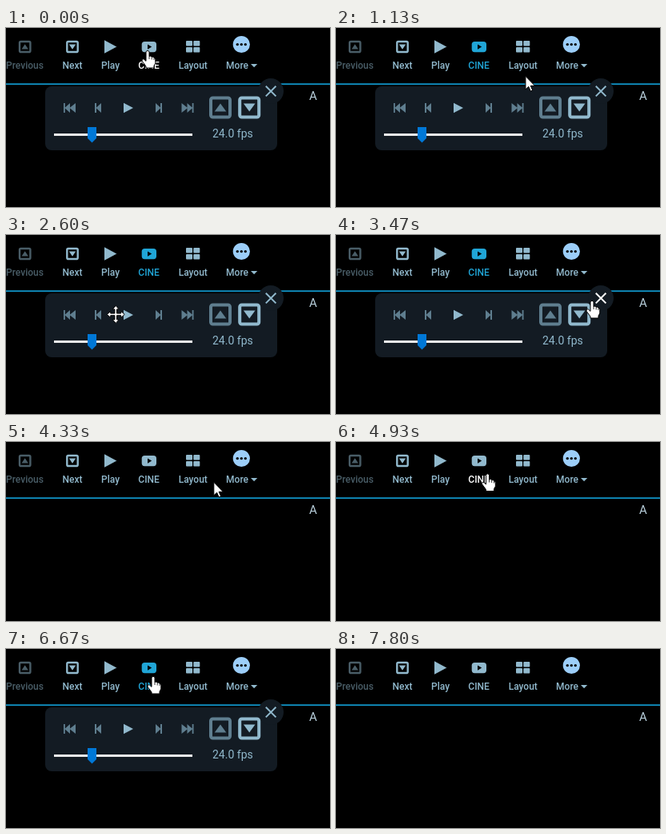
An HTML page that plays this animation: 405x224 px, repeating every 8470 ms.

```html
<!DOCTYPE html>
<html lang="en">
<head>
<meta charset="utf-8">
<title>Cine panel</title>
<style>
  html, body { margin: 0; width: 100%; height: 100%; overflow: hidden; background: #000; }
  svg { display: block; width: 100vw; height: 100vh; }
  text { font-family: Roboto, sans-serif; }
  .label { font-size: 12px; font-weight: 500; text-anchor: middle; fill: #91b9cd; }
  .icon { fill: #91b9cd; }
  .dim { opacity: .5; }
  .soft { fill: #5f7e8f; }
</style>
</head>
<body>
<svg viewBox="0 0 405 224">
  <defs>
    <g id="boxUp">
      <rect x="-6.7" y="-6.5" width="13.4" height="13" rx="1.6" fill="none" stroke="#91b9cd" stroke-width="2.4"/>
      <path d="M-4.2 3L0 -3.2L4.2 3Z" fill="#91b9cd"/>
    </g>
    <g id="bigUp">
      <rect x="-12" y="-12" width="24" height="24" rx="2.5" fill="none" stroke="currentColor" stroke-width="4"/>
      <path d="M-7.3 5L0 -5L7.3 5Z" fill="currentColor"/>
    </g>
    <path id="step" d="M0 -6H2V-.4L8 -6V6L2 .4V6H0Z"/>
    <path id="skip" d="M0 -6H1.8V-.4L8 -6V-.4L15 -6V6L8 .4V6L1.8 .4V6H0Z"/>
    <rect id="tile" width="8" height="6.6" rx="1"/>
    <circle id="dot" cy="20.6" r="1.7"/>
  </defs>
  <rect width="405" height="224"/>

  <g class="dim"><use href="#boxUp" x="23.7" y="23.5"/><text class="label" x="23.5" y="51">Previous</text></g>
  <use href="#boxUp" transform="translate(83 23.5) scale(1 -1)"/>
  <text class="label" x="83" y="51">Next</text>
  <path class="icon" d="M123 15.3L138.3 23.5L123 31.8Z"/>
  <text class="label" x="130.5" y="51">Play</text>
  <g id="cineIcon">
    <rect x="169.7" y="17" width="18.3" height="13.2" rx="3.6"/>
    <path d="M177 20.4L182.2 23.6L177 26.8Z" fill="#000"/>
  </g>
  <text class="label" id="cine" x="178.6" y="51">CINE</text>
  <g class="icon">
    <use href="#tile" x="225" y="16"/><use href="#tile" x="234.3" y="16"/>
    <use href="#tile" x="225" y="24"/><use href="#tile" x="234.3" y="24"/>
  </g>
  <text class="label" id="layout" x="233.8" y="51">Layout</text>
  <circle cx="294.3" cy="20.5" r="10.6" fill="#9ccef9"/>
  <use href="#dot" x="289.3"/><use href="#dot" x="294.3"/><use href="#dot" x="299.3"/>
  <text class="label" id="more" x="289" y="51">More</text>
  <path class="icon" d="M306 45H314.2L310.1 49.2Z"/>

  <rect y="69.3" width="405" height="1.8" fill="#1094c8"/>
  <text x="379" y="90" font-size="15" fill="#b9d0dc">A</text>

  <g id="panel">
    <rect x="49" y="73" width="290" height="80" rx="8" fill="#131b23"/>
    <circle cx="331" cy="79" r="16" fill="#131b23"/>
    <path id="close" d="M324.8 72.8L337.4 85.4M337.4 72.8L324.8 85.4" stroke-width="2"/>
    <g class="soft">
      <use href="#skip" x="72" y="100"/>
      <use href="#step" x="111" y="100"/>
      <use href="#step" transform="translate(195 100) scale(-1 1)"/>
      <use href="#skip" transform="translate(234.5 100) scale(-1 1)"/>
    </g>
    <path d="M147 93.8L159 100L147 106.2Z" fill="#91b9cd"/>
    <use href="#bigUp" x="268" y="99.5" color="#5f7e8f"/>
    <use href="#bigUp" transform="translate(304.2 99.5) scale(1 -1)" color="#91b9cd"/>
    <rect x="60" y="132" width="173" height="3" fill="#ececec"/>
    <path d="M102 124H113V138L107.5 143.4L102 138Z" fill="#0078d7"/>
    <text x="258" y="137" font-size="14" fill="#91b9cd">24.0 fps</text>
  </g>

  <g id="cursor" stroke-linejoin="round">
    <g id="hand">
      <path d="M-2 1.5Q0 -1 2 1.5V7.5Q4.2 6.2 5.2 8.2Q7.3 7.2 8 9.4Q9.8 9.2 9.8 11.5V16L8 19.2V22H-2V20L-7 13.2Q-7 10 -4.4 11.2L-2 13.4Z" fill="#fff" stroke="#000"/>
      <path d="M2 7.5V11M5.2 8.2V11.5M8 9.6V12" stroke="#000" stroke-width=".8"/>
    </g>
    <path id="move" d="M0 -11L4 -6.5H1.3V-1.3H6.5V-4L11 0L6.5 4V1.3H1.3V6.5H4L0 11L-4 6.5H-1.3V1.3H-6.5V4L-11 0L-6.5 -4V-1.3H-1.3V-6.5H-4Z" fill="#fff" stroke="#000"/>
    <g id="blocked" stroke="#c4100f" stroke-width="2.2">
      <circle r="8" fill="#fff" stroke="none"/>
      <circle r="6.5" fill="#fff"/>
      <path d="M-4.6 -4.6L4.6 4.6"/>
    </g>
    <path id="arrow" d="M0 0V16.5L3.8 13L6.3 18.8L8.8 17.7L6.3 12H11.6Z" fill="#fff" stroke="#000"/>
  </g>
</svg>
<script>
const LOOP = 8470, TICK = 200 / 3;
const el = id => document.getElementById(id);
const within = (t, a, b) => t >= a && t < b;

const spot = {
  start: [177, 28], cine: [184, 34], label: [189.5, 39.5], layout: [235, 44],
  panel: [307, 117], slider: [64, 127], corner: [326, 76], close: [320, 82],
  grip: [335, 95], out: [184, 130]
};

// Pointer moves: start time, end time, destination
const moves = [
  [870, 930, 'cine'], [1000, 1530, 'panel'], [1630, 2400, 'slider'],
  [2470, 3330, 'corner'], [3330, 3470, 'close'], [3930, 4800, 'layout'],
  [4800, 4930, 'label'], [4930, 5200, 'cine'], [5600, 6010, 'grip'],
  [6130, 6600, 'cine'], [7600, 7730, 'out']
];

// Each move slows into its end and bows slightly upwards.
function pointer(t) {
  let [x, y] = spot.start;
  for (const [from, to, name] of moves) {
    if (t <= from) break;
    const k = Math.min(1, (t - from) / (to - from)), s = 1 - (1 - k) ** 2;
    const dx = spot[name][0] - x, dy = spot[name][1] - y;
    x += dx * s;
    y += dy * s - .065 * Math.hypot(dx, dy) * Math.sin(Math.PI * s);
  }
  return [x, y];
}

function render(ms) {
  const t = Math.round(Math.floor(ms / TICK + .1) * TICK / 10) * 10 % LOOP;
  const [x, y] = pointer(t);
  const active = within(t, 70, 4000) || within(t, 5200, 7000);
  const open = t < 4000 || within(t, 5400, 7000);
  const shown = t < 7800;

  const over = (left, right) => shown && within(y, 8, 57) && within(x, left, right);
  const hover = { cine: over(160, 198), layout: over(212, 256), more: over(271, 318) };
  const overClose = open && Math.hypot(x - 331, y - 79) < 14;
  const overPanel = open && within(x, 49, 339) && within(y, 73, 153);

  for (const id in hover) el(id).style.fill = hover[id] ? '#fff' : '#91b9cd';
  if (active) el('cine').style.fill = '#20a5d6';
  el('cineIcon').setAttribute('fill', active ? '#20a5d6' : '#91b9cd');
  el('panel').style.display = open ? '' : 'none';
  el('close').setAttribute('stroke', overClose ? '#fff' : '#91b9cd');

  const kind = within(t, 1600, 2530) ? 'blocked'
    : overClose || Object.values(hover).includes(true) ? 'hand'
    : overPanel ? 'move' : 'arrow';
  for (const id of ['hand', 'move', 'blocked', 'arrow']) el(id).style.display = id === kind ? '' : 'none';
  el('cursor').style.display = shown ? '' : 'none';
  el('cursor').setAttribute('transform', `translate(${x} ${y})`);
}

const start = performance.now();
function loop() {
  render((performance.now() - start) % LOOP);
  requestAnimationFrame(loop);
}
loop();
</script>
</body>
</html>
```
